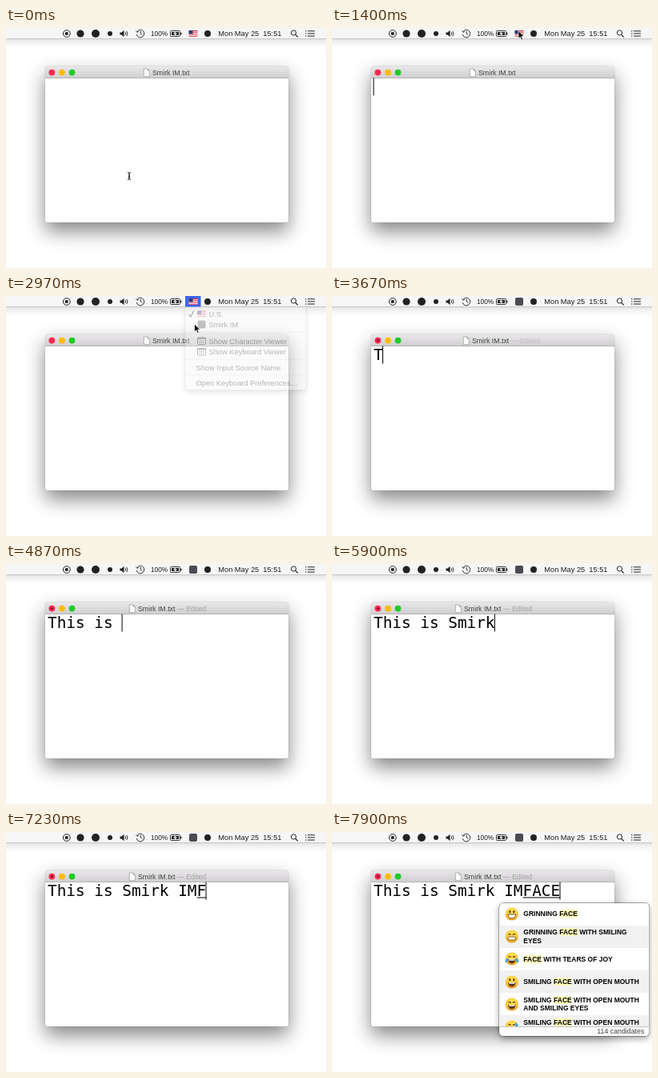
Write an HTML page that moves like this. It is 400 px wide and 300 px high and loops after 8000 ms.

```html
<!DOCTYPE html>
<html lang="en">
<head>
<meta charset="utf-8">
<title>Input method demo</title>
<style>
  html, body { margin: 0; width: 100%; height: 100%; overflow: hidden; background: #fff; }
  #stage { position: absolute; left: 0; top: 0; width: 400px; height: 300px; overflow: hidden;
    font-family: "Liberation Sans", Arial, sans-serif; }
  #stage > svg { position: absolute; left: 0; top: 0; }
  svg text { white-space: pre; }
  #window { position: absolute; left: 49px; top: 48px; width: 304px; height: 195px; border-radius: 4px 4px 3px 3px;
    background: linear-gradient(#e9e7e9, #d1cfd1 14px, #b5b3b5 14px, #b5b3b5 14.6px, #fff 14.6px);
    box-shadow: 0 0 1px rgba(0,0,0,.55), 0 11px 25px rgba(0,0,0,.48); }
  #popup { position: absolute; left: 209px; top: 88.5px; width: 187px; height: 166.5px; overflow: hidden;
    border-radius: 5px; background: #fff; }
  #popupBox { position: absolute; inset: 0; }
  #popupShadow { position: absolute; left: 209px; top: 88.5px; width: 187px; height: 166.5px; border-radius: 5px;
    box-shadow: 0 0 0 .8px rgba(0,0,0,.42), 0 3px 9px rgba(0,0,0,.4); }
  .row { position: relative; height: 28.2px; display: flex; align-items: center; color: #000;
    font: bold 8.5px/10.4px "Liberation Sans", Arial, sans-serif; }
  .row:nth-child(even) { background: #f1f1f1; }
  .row svg { flex: none; width: 17px; height: 17px; margin: 0 6px 0 7px; }
  .row span { width: 152px; white-space: pre-line; }
  mark { background: #fdfab9; color: inherit; }
  #footer { position: absolute; left: 0; right: 0; top: 154.5px; height: 12px; padding-right: 6px; text-align: right;
    border-top: .6px solid #c8c8c8; background: #fbfbfb; color: #444; font-size: 8.8px; line-height: 11.5px; }
</style>
</head>
<body>
<div id="stage">
  <div id="window"></div>
  <svg width="400" height="300" viewBox="0 0 400 300">
    <defs>
      <linearGradient id="under" x2="0" y2="1">
        <stop stop-color="#e4e4e4"/><stop offset="1" stop-color="#fff" stop-opacity="0"/>
      </linearGradient>
      <radialGradient id="skin" cy=".35" r=".65">
        <stop stop-color="#ffe95e"/><stop offset=".7" stop-color="#fbc934"/><stop offset="1" stop-color="#de8d18"/>
      </radialGradient>
      <g id="flag">
        <path fill="#fff" d="M0 0h11v8H0z"/>
        <path stroke="#d2273f" stroke-width="1.1" d="M0 .6h11M0 2.8h11M0 5h11M0 7.2h11"/>
        <path fill="#2b3a78" d="M0 0h5v4.4H0z"/>
      </g>
      <g id="panel">
        <rect x=".5" y=".5" width="10" height="8.5" rx="1" fill="#fff" stroke="#333"/>
        <path stroke="#333" stroke-width="1.8" d="M0 1.3h11"/>
        <path stroke="#444" stroke-width="1.3" d="M2.5 4h6M2.5 6.5h6" stroke-dasharray="1.4 .8"/>
      </g>
    </defs>

    <rect y="14" width="400" height="14" fill="url(#under)"/>
    <rect width="400" height="13.5" fill="#f6f6f6"/>
    <path stroke="#b9b9b9" stroke-width=".8" d="M0 13.5h400"/>
    <g fill="none" stroke="#222">
      <circle cx="75.8" cy="7" r="4.4"/>
      <path fill="#222" stroke="none" d="M74 5.2h3.6v3.6H74z"/>
      <circle cx="93" cy="7" r="4.6" fill="#222" stroke="none"/>
      <circle cx="112" cy="7" r="5" fill="#222" stroke="none"/>
      <circle cx="130" cy="7" r="3" fill="#222" stroke="none"/>
      <path fill="#222" stroke="none" d="M142.500 5.500h2l3-2.700v8.400l-3-2.700h-2z"/>
      <path stroke-width=".9" d="M149 5.200q1.500 1.800 0 3.600M150.700 3.900q2.600 3.100 0 6.200"/>
      <path stroke-width=".9" d="M164 4.300a4.800 4.800 0 1 1-.8 3.600M162.500 3.500l1.400 1.900 2-1M168.300 4v3.200l2 1.300"/>
      <rect x="205.500" y="3.500" width="12" height="7" rx="1" stroke-width=".9"/>
      <path fill="#222" stroke="none" d="M207 5h9v4h-9zM218.300 5.500h1.200v3h-1.200z"/>
      <path fill="#f6f6f6" stroke="none" d="M212.300 3.800l-3.300 3.600h2.300l-.8 3 3.500-3.900h-2.400z"/>
      <circle cx="252" cy="7" r="4" fill="#222" stroke="none"/>
      <circle cx="359.500" cy="6" r="3.100"/>
      <path stroke-width="1.300" d="M361.800 8.400l3 3"/>
      <path d="M377 3.800h9M377 6.900h9M377 10h9M374 3.800h1.500M374 6.900h1.500M374 10h1.500"/>
    </g>
    <g fill="#1c1c1c">
      <text x="181" y="10" font-size="8.300">100%</text>
      <text x="265.300" y="10.300" font-size="9.250">Mon May 25  15:51</text>
    </g>
    <rect id="menuLit" x="224" width="19.500" height="13.500" fill="#3f66f2"/>
    <use id="flagIcon" href="#flag" x="228.500" y="3"/>
    <rect id="imIcon" x="229" y="2" width="10" height="10" rx="2" fill="#4a4b54"/>

    <circle cx="57.300" cy="55.600" r="3.900" fill="#fb2a50"/>
    <circle id="editedDot" cx="57.300" cy="55.600" r="1.300" fill="#6d0618"/>
    <circle cx="70" cy="55.600" r="3.900" fill="#fdbb0a"/>
    <circle cx="82.500" cy="55.600" r="3.900" fill="#1fcb2a"/>
    <g id="title" font-size="8.800">
      <path fill="#fff" stroke="#999" stroke-width=".7" d="M172.300 51h4.700l2.300 2.300v7.400h-7zM177 51v2.300h2.300"/>
      <text x="183" y="59" fill="#444">Smirk IM.txt</text>
      <text id="edited" x="232" y="59" fill="#a3a1a3">— Edited</text>
    </g>

    <text id="typed" x="52" y="80.300" font-size="19.370" font-family="DejaVu Sans Mono, monospace"></text>
    <rect id="underline" y="81.500" height="1"/>
    <rect id="caret" y="62.500" width="1" height="22"/>

    <g id="menu" font-size="9.300" fill="#222" style="filter:drop-shadow(0 2px 3px rgba(0,0,0,.35))">
      <path fill="#f5f5f5" stroke="#bbb" stroke-width=".5" d="M224 13.500h151v100q0 4-4 4H228q-4 0-4-4z"/>
      <rect id="rowLit" x="224" width="151" height="13" fill="#3673f4"/>
      <path stroke="#dcdcdc" d="M224 45.500h151M224 79.500h151M224 98.500h151"/>
      <path id="check" fill="none" stroke-width="1.400" d="M228.500 23l2.300 3 4-7.500"/>
      <use href="#flag" x="239" y="18.500"/>
      <rect x="239.500" y="30.500" width="10" height="10" rx="2" fill="#4a4b54"/>
      <use href="#panel" x="239" y="51.500"/>
      <use href="#panel" x="239" y="65"/>
      <text id="itemUS" x="253.500" y="26">U.S.</text>
      <text id="itemIM" x="253.500" y="39">Smirk IM</text>
      <text x="253.500" y="59.500">Show Character Viewer</text>
      <text x="253.500" y="72.500">Show Keyboard Viewer</text>
      <text x="237.500" y="92.500">Show Input Source Name</text>
      <text x="237.500" y="112">Open Keyboard Preferences…</text>
    </g>
  </svg>

  <div id="popupBox">
    <div id="popupShadow"></div>
    <div id="popup"><div id="rows"></div><div id="footer">114 candidates</div></div>
  </div>

  <svg width="400" height="300" viewBox="0 0 400 300">
    <g id="pointer">
      <path id="beam" fill="none" stroke="#222" d="M-2-4.500q2 0 2 1.500v6q0 1.500-2 1.500M2-4.500q-2 0-2 1.500v6q0 1.500 2 1.500M-1.200 1h2.400"/>
      <path id="arrow" fill="#000" stroke="#fff" stroke-width=".8" d="M0 0v9.800l2.300-2.100 1.600 3.700 1.700-.8-1.600-3.500h3.100z"/>
    </g>
  </svg>
</div>

<script>
const LOOP = 8000, LEFT = 52, CHAR = 11.66;
const $ = id => document.getElementById(id);

const EYES = {
  open: '<ellipse cx="6.800" cy="6.500" rx="1.300" ry="2"/><ellipse cx="12.200" cy="6.500" rx="1.300" ry="2"/>',
  smile: '<path d="M4.800 7.500q1.800-3 3.600 0M10.600 7.500q1.800-3 3.600 0" fill="none" stroke="#5b3510" stroke-width="1.200"/>'
};
const MOUTHS = {
  laugh: '<path d="M4 10h11q-.8 6-5.500 6T4 10z"/><path fill="#fff" d="M5 10.300h9l-.7 1.800H5.700z"/>',
  grin: '<path fill="#fff" stroke="#5b3510" stroke-width=".9" d="M4 10h11q-.8 5.500-5.500 5.500T4 10z"/>',
  teeth: '<rect x="4" y="10" width="11" height="4.500" rx="2.200" fill="#fff" stroke="#5b3510" stroke-width=".9"/>'
};
const TEARS = '<path fill="#3fa9ee" d="M4.500 8.500Q-1.500 10.500.2 14.500q3.600 1.500 4.300-6zM14.500 8.500q6 2 4.300 6-3.600 1.500-4.300-6z"/>';
const SWEAT = '<path fill="#3fa9ee" d="M15.500 3q-3 4-.5 6.500 4 .5 3-3z"/>';

const face = (eyes, mouth, extra = '') =>
  `<svg viewBox="0 0 19 19" fill="#5b3510"><circle cx="9.500" cy="9.500" r="9" fill="url(#skin)"/>${EYES[eyes]}${MOUTHS[mouth]}${extra}</svg>`;

const CANDIDATES = [
  ['GRINNING FACE', face('open', 'grin')],
  ['GRINNING FACE WITH SMILING\nEYES', face('smile', 'teeth')],
  ['FACE WITH TEARS OF JOY', face('smile', 'laugh', TEARS)],
  ['SMILING FACE WITH OPEN MOUTH', face('open', 'laugh')],
  ['SMILING FACE WITH OPEN MOUTH\nAND SMILING EYES', face('smile', 'laugh')],
  ['SMILING FACE WITH OPEN MOUTH\nAND COLD SWEAT', face('smile', 'laugh', SWEAT)]
];
$('rows').innerHTML = CANDIDATES.map(([name, icon]) =>
  `<div class="row">${icon}<span>${name.replace('FACE', '<mark>FACE</mark>')}</span></div>`).join('');

const TEXT = 'This is Smirk IMFACE';
const KEY_TIMES = [3430, 3730, 3900, 4100, 4370, 4530, 4730, 4860, 5170, 5470,
  5570, 5770, 5890, 6100, 6270, 6570, 7170, 7330, 7530, 7700];
// Composing spans: from, until, first character
const COMPOSING = [[5170, 5470, 8], [6270, 6760, 14], [7170, LOOP, 16]];
// Pointer stops: time, x, y
const PATH = [[0, 154, 185], [700, 154, 185], [1400, 233, 3.500], [1900, 233, 3.500], [2270, 235.500, 30], [2430, 235.500, 35]];

const between = (t, a, b) => t >= a && t < b;
const ramp = (t, a, b) => Math.min(1, Math.max(0, (t - a) / (b - a)));
const ease = p => p * p * (3 - 2 * p);
const show = (id, on) => $(id).style.visibility = on ? 'visible' : 'hidden';

function pointerAt(t) {
  const next = PATH.findIndex(stop => stop[0] > t);
  if (next < 0) return PATH.at(-1).slice(1);
  const [t0, x0, y0] = PATH[next - 1], [t1, x1, y1] = PATH[next];
  const p = ease(ramp(t, t0, t1));
  return [x0 + (x1 - x0) * p, y0 + (y1 - y0) * p];
}

function drawPointer(t) {
  const [x, y] = pointerAt(t);
  const visible = t < 3430, inText = y > 62 && t < 1500;
  $('pointer').setAttribute('transform', `translate(${x} ${y})`);
  show('beam', visible && inText);
  show('arrow', visible && !inText);
  return y;
}

function drawMenu(t, pointerY) {
  const onIM = pointerY > 30.5;
  const lit = t < 2730 || between(t, 2800, 2860);
  show('menuLit', between(t, 1770, 3070));
  show('flagIcon', t < 3070);
  show('imIcon', t >= 3070);
  $('menu').style.opacity = t < 1770 ? 0 : 1 - ramp(t, 2870, 3020);
  $('rowLit').setAttribute('y', onIM ? 29 : 16);
  $('rowLit').style.opacity = lit && pointerY > 13 ? 1 : 0;
  const usLit = lit && !onIM && pointerY > 13;
  $('itemUS').setAttribute('fill', usLit ? '#fff' : '#222');
  $('check').setAttribute('stroke', usLit ? '#fff' : '#222');
  $('itemIM').setAttribute('fill', lit && onIM ? '#fff' : '#222');
}

function drawText(t) {
  const count = KEY_TIMES.filter(k => k <= t).length;
  const end = LEFT + count * CHAR;
  $('typed').textContent = TEXT.slice(0, count);
  $('caret').setAttribute('x', count ? end - .7 : 51.5);
  show('caret', between(t, 170, 1770) || t >= 3200);
  const span = COMPOSING.find(([from, until]) => between(t, from, until));
  show('underline', span);
  if (span) {
    const start = LEFT + span[2] * CHAR;
    $('underline').setAttribute('x', start);
    $('underline').setAttribute('width', end - start);
  }
}

function drawTitle(t) {
  const p = ease(ramp(t, 3470, 3900));
  $('title').setAttribute('transform', `translate(${-18 * p} 0)`);
  $('edited').style.opacity = p;
  show('editedDot', t >= 3430);
}

function drawPopup(t) {
  const early = t < 7100;
  $('popupBox').style.opacity = early ? (t >= 6500 ? 1 - ramp(t, 6700, 6900) : 0) : +(t >= 7370);
  $('popupBox').style.transform = `translateX(${early ? -.5 : .3}px)`;
}

function frame() {
  const t = performance.now() % LOOP;
  drawMenu(t, drawPointer(t));
  drawText(t);
  drawTitle(t);
  drawPopup(t);
  requestAnimationFrame(frame);
}
frame();
</script>
</body>
</html>
```
